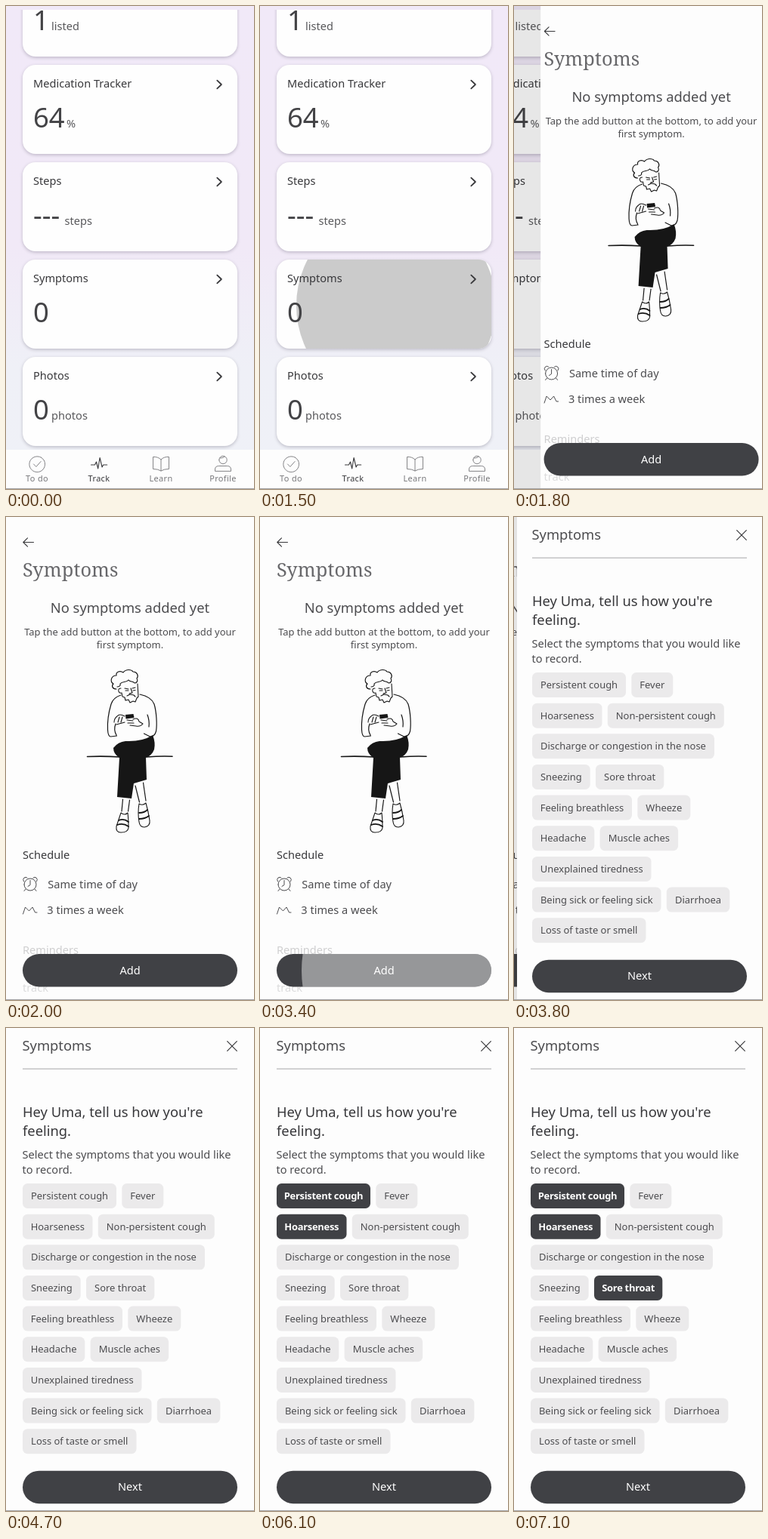
Animation of 328 by 640 pixels, one loop 8000 ms. Source, as an HTML page with a canvas:

```html
<!DOCTYPE html>
<html lang="en">
<head>
<meta charset="utf-8">
<title>Symptom tracker</title>
<style>
html, body { margin: 0; width: 100%; height: 100%; overflow: hidden; background: #fdfdfd; }
canvas { display: block; width: 100vw; height: 100vh; }
</style>
</head>
<body>
<canvas id="stage"></canvas>
<script>
const W = 328, H = 640, LOOP = 8000, STEP = 100;
const PAGE = '#fdfdfd', DARK = '#404145', INK = '#38383b', BODY = '#4c4c4f';
const SANS = '"Noto Sans", "Open Sans", sans-serif';
const SERIF = '"Noto Serif", serif';
const SMALL = 12.95, MID = 14.58, LARGE = 18.35;

const canvas = document.getElementById('stage');
const ctx = canvas.getContext('2d');
const dpr = window.devicePixelRatio || 1;
canvas.width = W * dpr;
canvas.height = H * dpr;

function text(str, x, y, size, opt = {}) {
  const { weight = 400, color = BODY, align = 'left', family = SANS, spacing = 0 } = opt;
  ctx.font = `${weight} ${size}px ${family}`;
  ctx.letterSpacing = spacing + 'px';
  ctx.textAlign = align;
  ctx.fillStyle = color;
  ctx.fillText(str, x, y);
}

const heading = (str, x, y, color = INK) => text(str, x, y, MID, { weight: 500, color });

function box(x, y, w, h, r, color) {
  ctx.beginPath();
  ctx.roundRect(x, y, w, h, r);
  ctx.fillStyle = color;
  ctx.fill();
}

function line(d, width = 1.1, color = INK) {
  ctx.lineWidth = width;
  ctx.strokeStyle = color;
  ctx.stroke(new Path2D(d));
}

function shape(d, fill, width = 0) {
  ctx.fillStyle = fill;
  ctx.fill(new Path2D(d));
  if (width) line(d, width, '#161616');
}

// Touch circle clipped to a rounded box; grows and fades with age in ms
function ripple(x, y, w, h, r, circle, color, age) {
  if (age < 0 || age >= 300) return;
  const [cx, cy, size] = circle;
  ctx.save();
  ctx.beginPath();
  ctx.roundRect(x, y, w, h, r);
  ctx.clip();
  ctx.globalAlpha = 1 - age / 300;
  ctx.beginPath();
  ctx.arc(cx, cy, size + age * 0.8, 0, 7);
  ctx.fillStyle = color;
  ctx.fill();
  ctx.restore();
}

function button(label, y, age) {
  box(22, y, 284, 43.5, 21.75, DARK);
  ripple(22, y, 284, 43.5, 21.75, [210, y + 22, 155], 'rgba(255,255,255,.45)', age);
  text(label, 164, y + 26.5, MID, { weight: 500, color: '#fff', align: 'center' });
}

// Track page

const cards = [
  ['', '1', 'listed', 60],
  ['Medication Tracker', '64', '%', 80],
  ['Steps', '---', 'steps', 77.5],
  ['Symptoms', '0', '', 0],
  ['Photos', '0', 'photos', 60]
];

function card([title, value, unit, unitX], i, age) {
  const y = -51 + i * 129;
  ctx.save();
  ctx.shadowColor = 'rgba(70,65,85,.3)';
  ctx.shadowBlur = 4 * dpr;
  ctx.shadowOffsetY = 1.5 * dpr;
  box(22, y, 284, 118, 17, '#fefefe');
  ctx.restore();
  if (title === 'Symptoms') {
    ripple(22, y, 284, 118, 17, [180, y + 61, 132], '#cbcbcb', age);
  }
  heading(title, 36, y + 30);
  text(value, 36, y + 83.4, 36.45, { color: '#434346' });
  text(unit, unitX, y + 83.2, MID, { color: '#58585b' });
  line(`M279.3 ${y + 20.7}l5.6 5.3-5.6 5.3`, 1.8);
}

function navBar() {
  ctx.fillStyle = PAGE;
  ctx.fillRect(0, 588, W, 52);
  const gray = '#77777a';
  line('M46.5 598.2A10.4 10.4 0 1 0 50.6 602.6M36.5 607l3.4 3.5 6.2-7M46.5 598.2a10.4 10.4 0 0 1 4.1 4.4', 0.9, gray);
  line('M112.5 608h5l2-4 2.2 9 2.4-14.5 3 12.5 1.6-3h5', 1.1, INK);
  line('M205 601q-4-4-10.5-3.5v16q6.5 0 10.5 2.5 4-2.5 10.5-2.5v-16q-6.500-.5-10.5 3.5v15', 0.9, gray);
  line('M276.5 616v-2q0-4.500 5-4.500h11q5 0 5 4.500v2zM281.8 601.500a5.200 5.200 0 1 0 10.400 0a5.200 5.200 0 1 0-10.400 0M283 599q5 0 6-2', 0.9, gray);
  ['To do', 'Track', 'Learn', 'Profile'].forEach((label, i) =>
    text(label, 41 + i * 82, 629.7, 10.93, { color: i === 1 ? INK : '#77777a', align: 'center', spacing: 0.36 }));
}

function trackPage(age) {
  const g = ctx.createLinearGradient(0, 0, 0, H);
  g.addColorStop(0, '#f1e9f8');
  g.addColorStop(0.5, '#f1e9f7');
  g.addColorStop(0.75, '#eff0f7');
  g.addColorStop(1, '#eff1f7');
  ctx.fillStyle = g;
  ctx.fillRect(0, 0, W, H);
  ctx.save();
  ctx.beginPath();
  ctx.rect(0, 5, W, H);
  ctx.clip();
  cards.forEach((c, i) => card(c, i, age));
  ctx.restore();
  navBar();
}

// Empty symptoms page

function seatedMan() {
  const black = '#161616';
  line('M107.5 317.5q22-1 43 .5M186 318q18-1.5 34-.8', 1.6, black);
  // Sweater
  line('M152 236q-10 3-13 12c-3 10-5 24-4.500 34q.5 9 4 9l8-1M177 235q15 3 19 13c3 10 4 27 2.500 36q-2 7-8 7l-8-4M145 274q-3 8 1 15M187 262q3 8 2 16', 1.2, black);
  // Trousers
  shape('M142 306q6-8 16-9 22 1 36-8 4 10 2 19-3 8-11 11l1 29-17 5-3 20-19-2 3-52q-8-5-8-13z', black);
  // Hair, face and beard
  line('M146 228c-5 0-7-4-4-7-5-3-3-11 4-11-1-5 5-7 9-4 4-5 11-4 13-1 5 0 8 5 5 9 2 3 0 6-3 6-2-3-6-1-8-4-3 4-8 1-11 5 1 3-2 4-4 4', 1.2, black);
  line('M152 227q-4 0-3 4 1 3 4 2l1 5 3 1 1 4 4-1 2 4 4-2 3 1 2-5 2-2-1-17M157 227l5 1M167 227l4-1M165 227l2 6-4 1M158 230l4 0M168 230l3-.5M160 237l4-2 5 1 2 2', 1.1, black);
  // Hands and phone
  line('M157 264q-7-4-10 0-4 3-4 8M150 265l-2 7M154 265l-2 7M146 275l11-3M168 268q7-3 8 3l5 3q-3 4-9 3l-8-1M160 269l8 1M161 273l8 0', 1.1, black);
  shape('M158 262l10.5-1 1 5-11 1.5z', black);
  // Legs and sandals
  line('M154.5 374l-1.5 16M163.5 375l-2 15M171 356l5.5 22M181.5 352l3.500 24', 1.2, black);
  shape('M152 392q-3 9-6 18-1 8 6 8 9 0 10-6 0-12-1-20-4 4-9 0z', PAGE, 1.1);
  shape('M176 380q-2 12 0 24 1 7 7 7 8-1 7-9-2-13-5-23-4 4-9 1z', PAGE, 1.1);
  line('M149 402q7-3 13 2M147 408q8-3 15 2M176 392q7 0 11-4M176 400q8 0 13-4', 1.8, black);
}

function emptyPage(age) {
  line('M36.5 33.5H22.8M28.5 27.8l-5.7 5.7 5.700 5.7');
  text('Symptoms', 22, 79, 25.3, { weight: 300, family: SERIF, color: '#68686b', spacing: 0.1 });
  text('No symptoms added yet', 164, 126.5, LARGE, { align: 'center' });
  text('Tap the add button at the bottom, to add your', 164, 157, SMALL, { align: 'center' });
  text('first symptom.', 164, 174.3, SMALL, { align: 'center' });
  seatedMan();
  heading('Schedule', 22, 452.5);
  line('M24 487a8 8 0 1 0 16 0a8 8 0 1 0-16 0M32 481.5v6l-3 2M23.5 483q-2-3 .5-5 2-1.5 4 0M40.5 483q2-3-.5-5-2-1.5-4 0M26 493l-2 2.5M38 493l2 2.5', 0.9);
  text('Same time of day', 55.3, 491.5, MID);
  line('M22.5 526l3-9 5 5 4.5-5 3.5 7 2.5 0', 0.9);
  text('3 times a week', 54.3, 526.2, MID);
  heading('Reminders', 22, 579, '#cfcfd0');
  text('track', 22, 628.7, MID, { color: '#dcdcdd' });
  button('Add', 579, age);
}

// Symptom picker

const chipRows = [
  [['Persistent cough', 124, 5200], ['Fever', 55]],
  [['Hoarseness', 92.5, 6100], ['Non-persistent cough', 154]],
  [['Discharge or congestion in the nose', 241]],
  [['Sneezing', 76.7], ['Sore throat', 90.3, 7100]],
  [['Feeling breathless', 132], ['Wheeze', 70]],
  [['Headache', 82.3], ['Muscle aches', 103.5]],
  [['Unexplained tiredness', 157.5]],
  [['Being sick or feeling sick', 170.5], ['Diarrhoea', 83.5]],
  [['Loss of taste or smell', 150.5]]
];

function chips(t) {
  chipRows.forEach((row, i) => {
    const y = 206 + i * 40.65;
    let x = 22;
    for (const [label, w, pickedAt] of row) {
      const picked = t >= pickedAt;
      box(x, y, w, 33, 6.5, picked ? DARK : '#ebeaeb');
      text(label, x + w / 2, y + 21, SMALL, picked
        ? { weight: 600, color: '#fff', align: 'center', spacing: -0.28 }
        : { align: 'center' });
      x += w + 7.3;
    }
  });
}

function pickerPage(t) {
  text('Symptoms', 21.5, 30, LARGE);
  line('M292.7 17.7l12.6 12.6M305.3 17.7l-12.6 12.6', 1.2);
  ctx.fillStyle = '#cbcbcc';
  ctx.fillRect(22, 53.3, 284, 1.8);
  text("Hey Uma, tell us how you're", 22, 118.3, LARGE, { color: INK });
  text('feeling.', 22, 143, LARGE, { color: INK });
  text('Select the symptoms that you would like', 21.5, 173, MID);
  text('to record.', 21.5, 193, MID);
  chips(t);
  button('Next', 586.7, -1);
}

// Timeline

function slide(t, start) {
  const u = Math.min(1, Math.max(0, (t - start) / 400));
  return 1 - (1 - u) ** 3;
}

// The old page drifts and dims while the new one uncovers from the right
function push(p, under, over) {
  if (p < 1) {
    ctx.save();
    ctx.translate(-0.2 * W * p, 0);
    under();
    ctx.restore();
    ctx.fillStyle = `rgba(0,0,0,${0.1 * p})`;
    ctx.fillRect(0, 0, W, H);
  }
  if (p > 0) {
    const edge = W * (1 - p);
    ctx.save();
    ctx.beginPath();
    ctx.rect(edge, 0, W, H);
    ctx.clip();
    ctx.fillStyle = PAGE;
    ctx.fillRect(0, 0, W, H);
    ctx.translate(edge / 2, 0);
    over();
    ctx.restore();
  }
}

function draw(t) {
  ctx.setTransform(dpr, 0, 0, dpr, 0, 0);
  ctx.lineCap = ctx.lineJoin = 'round';
  ctx.fillStyle = PAGE;
  ctx.fillRect(0, 0, W, H);
  if (t < 3400) {
    push(slide(t, 1590), () => trackPage(t - 1500), () => emptyPage(-1));
  } else {
    push(slide(t, 3492), () => emptyPage(t - 3400), () => pickerPage(t));
  }
  ctx.fillStyle = '#a3a3a5';
  ctx.fillRect(0, 639, W, 1);
}

const begin = performance.now();
function tick() {
  const t = (performance.now() - begin) % LOOP;
  draw(Math.floor(t / STEP) * STEP);
  requestAnimationFrame(tick);
}
tick();
</script>
</body>
</html>
```
